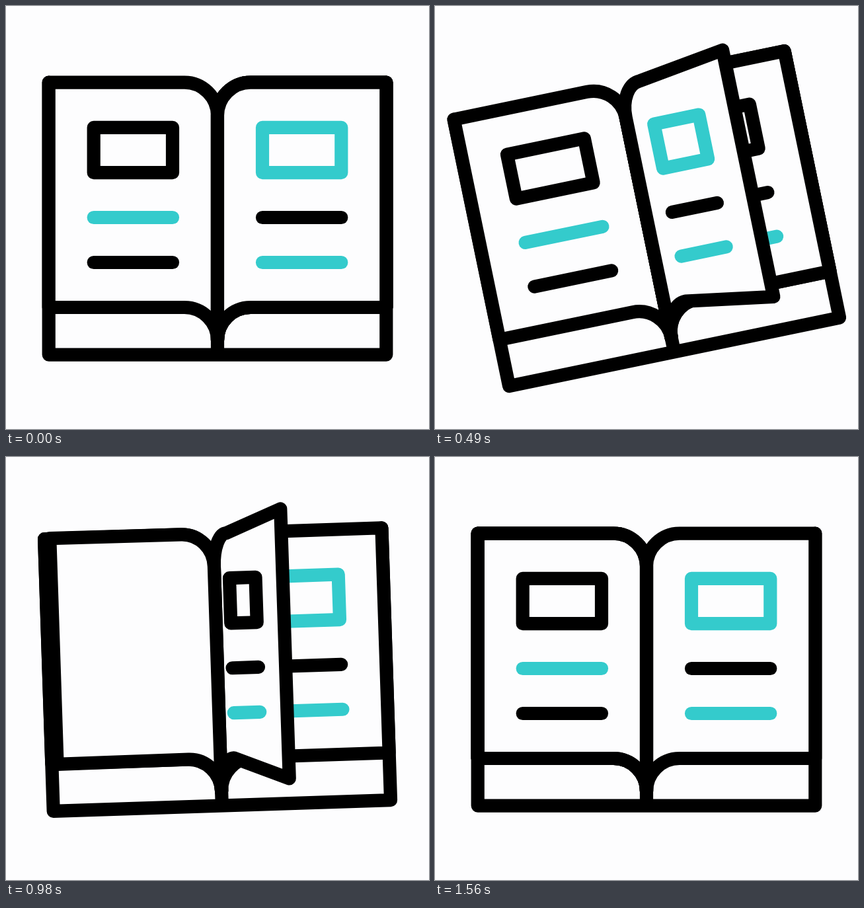
Write an HTML page with a canvas that moves like this. It is 640 px wide and 640 px high and loops after 1.65 s.

```html
<!DOCTYPE html>
<html lang="en">
<head>
<meta charset="utf-8">
<title>Book</title>
<style>
html, body { margin: 0; width: 100%; height: 100%; overflow: hidden; background: #fdfdfe; }
canvas { display: block; }
</style>
</head>
<body>
<canvas id="stage" width="640" height="640"></canvas>
<script>
const ctx = document.getElementById('stage').getContext('2d');
const PAPER = '#fdfdfe', INK = '#000', TEAL = '#34cbcc';
const LOOP = 1650, STEPS = 17;

// Book geometry, with the origin in the middle of the stage.
const HALF = 255.3, TOP = -204.4, FOOT = 136, BASE = 207.6, ROUND = 50;

// Keys of the swing: [step, degrees].
const SWING = [[0, 0], [4.75, -12.1], [7.65, 7.2], [10.5, -2.7], [12.8, 1.95], [15.5, 0]];

// Each page rises from the right to the spine, then lands on the left: [start, end] in steps.
const TURNS = [
  { rise: [2.4, 6.55], land: [6.93, 10.67] },
  { rise: [6.42, 10.95], land: [10.95, 13.95] }
];

const progress = (t, [start, end]) => Math.min(1, Math.max(0, (t - start) / (end - start)));
const smooth = u => u * u * (3 - 2 * u);

function swingAt(step) {
  for (let i = 1; i < SWING.length; i++) {
    const [t0, a0] = SWING[i - 1], [t1, a1] = SWING[i];
    if (step <= t1) return a0 + (a1 - a0) * smooth(progress(step, [t0, t1]));
  }
  return 0;
}

// 1 lies flat on the right, 0 stands on edge, -1 lies flat on the left.
function turnAt(step, { rise, land }) {
  const up = Math.pow(progress(step, rise), 2.2);
  const down = 1 - Math.pow(1 - progress(step, land), 2);
  return 1 - up - down;
}

function stroke(color, path) {
  ctx.strokeStyle = color;
  ctx.stroke(path);
}

// A picture box and two lines of text, squeezed towards the spine.
function content(turn, [box, line1, line2]) {
  const scale = turn > 0 ? Math.pow(turn, 1.22) : turn;
  const x0 = 68 * scale, x1 = 187.3 * scale;
  const frame = new Path2D();
  frame.rect(Math.min(x0, x1), -136.2, Math.abs(x1 - x0), 68.4);
  stroke(box, frame);
  [[0, line1], [68, line2]].forEach(([y, color]) => {
    const line = new Path2D();
    line.moveTo(x0, y);
    line.lineTo(x1, y);
    stroke(color, line);
  });
}

function pageShape(turn) {
  const lift = (turn > 0 ? 57 : 26) * (1 - Math.abs(turn));
  const edge = HALF * turn, bend = ROUND * turn;
  const k = 0.4477; // quarter circle as a Bézier
  const shape = new Path2D();
  shape.moveTo(0, TOP + ROUND);
  shape.bezierCurveTo(0, TOP + ROUND * k, bend * k, TOP, bend, TOP);
  shape.lineTo(edge, TOP - lift);
  shape.lineTo(edge, FOOT + lift);
  shape.lineTo(bend, FOOT);
  shape.bezierCurveTo(bend * k, FOOT, 0, FOOT + ROUND * k, 0, FOOT + ROUND);
  shape.closePath();
  return shape;
}

function page(turn, colors, filled = true) {
  const shape = pageShape(turn);
  if (filled) {
    ctx.fillStyle = PAPER;
    ctx.fill(shape);
  }
  if (colors) content(turn, colors);
  stroke(INK, shape);
}

function cover() {
  const path = new Path2D();
  path.moveTo(-HALF, TOP);
  path.lineTo(-HALF, BASE);
  path.lineTo(HALF, BASE);
  path.lineTo(HALF, TOP);
  path.moveTo(0, TOP + ROUND);
  path.lineTo(0, BASE - 4);
  stroke(INK, path);
}

function draw(step) {
  const [first, second] = TURNS.map(turn => turnAt(step, turn));
  const left = [INK, TEAL, INK], right = [TEAL, INK, TEAL], middle = [INK, INK, TEAL];

  ctx.setTransform(1, 0, 0, 1, 0, 0);
  ctx.fillStyle = PAPER;
  ctx.fillRect(0, 0, 640, 640);
  ctx.translate(320, 320);
  ctx.rotate(swingAt(step) * Math.PI / 180);
  ctx.lineWidth = 20.2;
  ctx.lineCap = ctx.lineJoin = 'round';

  cover();
  page(-1, left);
  page(1, right);
  if (second > 0) page(second, middle);
  page(first, first > 0 ? right : null);
  if (second <= 0) page(second, left, false);
}

function frame() {
  const time = performance.now() % LOOP;
  let step = STEPS - 1;
  while (Math.round(step * 9.75) * 10 > time) step--;
  draw(step);
  requestAnimationFrame(frame);
}
frame();
</script>
</body>
</html>
```
